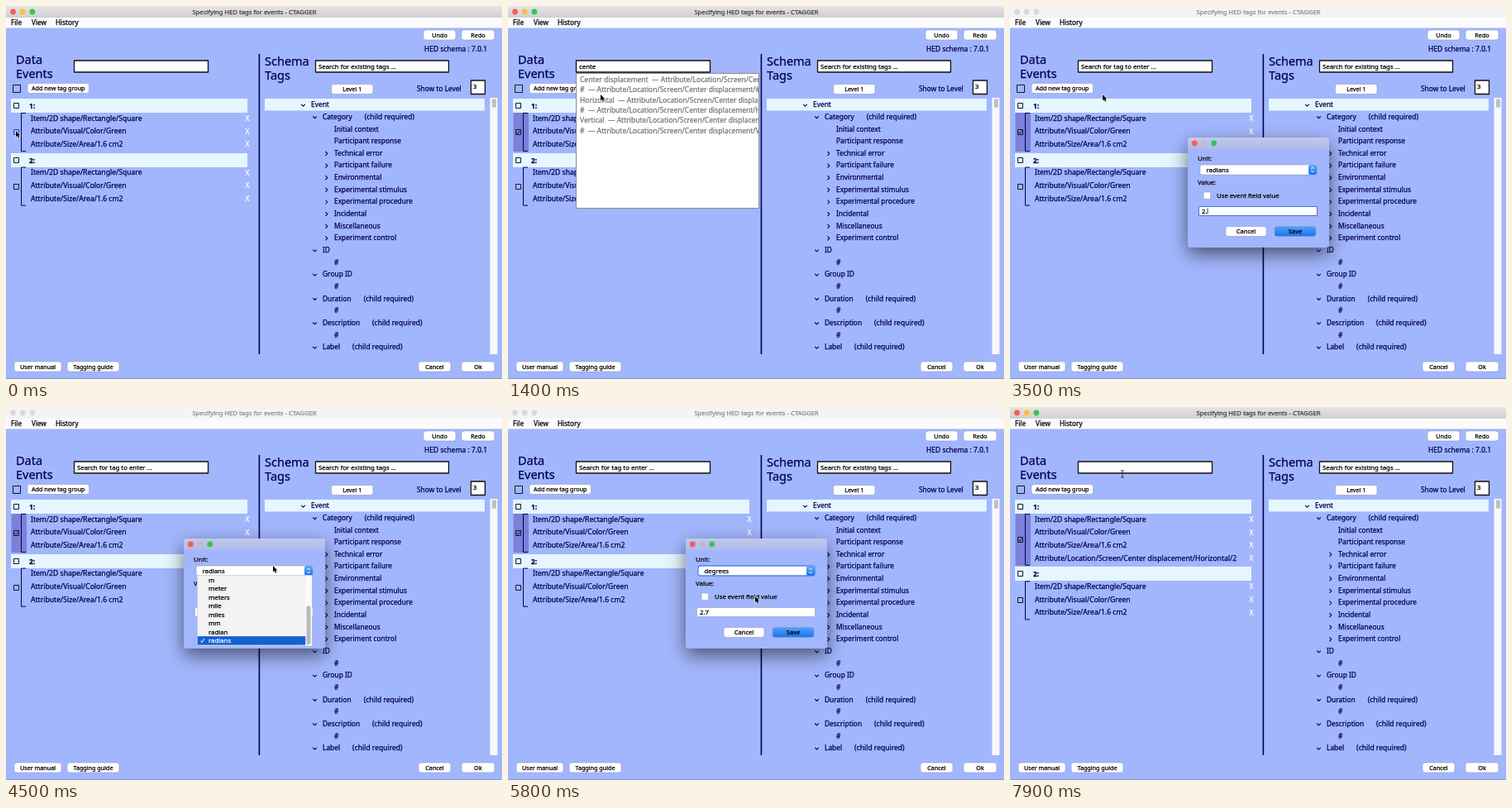
An HTML page with a canvas that plays this animation: 600 by 451 pixels, repeating every 8 s.

```html
<!DOCTYPE html>
<html>
<head>
<meta charset="utf-8">
<title>Tag editor</title>
<style>
html, body { margin: 0; width: 100%; height: 100%; overflow: hidden; background: #a2b6fd; }
canvas { display: block; width: 600px; height: 451px; }
</style>
</head>
<body>
<canvas id="stage"></canvas>
<script>
const LOOP = 8000, STEP = 100;
const NAVY = '#00004f', BLUE = '#a2b6fd', PALE = '#e5f6ff';
const canvas = document.getElementById('stage');
const ratio = window.devicePixelRatio || 1;
canvas.width = 600 * ratio;
canvas.height = 451 * ratio;
const c = canvas.getContext('2d');
c.scale(ratio, ratio);

// ---- timeline ----
const typed = [[0, ''], [600, 'c'], [700, 'ce'], [1000, 'cen'], [1200, 'cent'], [1400, 'cente'],
  [1600, 'center'], [1800, 'center '], [2000, 'center d'], [2600, null], [7800, '']];
const picked = [[0, -1], [2200, 0], [2300, 1], [2400, 2], [2500, 3]];
const amount = [[0, ''], [3300, '2'], [3500, '2.'], [3700, '2.7']];
const pointer = [[0, 12, 151], [200, 12, 151], [500, 112, 107], [3800, 112, 107], [4300, 323, 192],
  [4600, 323, 192], [4900, 299, 229], [5900, 299, 229], [6300, 345, 269], [7200, 345, 269], [7700, 136, 81]];
const scroll = [[0, 6], [4800, 6], [5200, 0]];

const shapeTags = ['Item/2D shape/Rectangle/Square', 'Attribute/Visual/Color/Green', 'Attribute/Size/Area/1.6 cm2'];
const newTag = 'Attribute/Location/Screen/Center displacement/Horizontal/2';
const units = 'cm degree degrees feet foot km m meter meters mile miles mm radian radians'.split(' ');

const control = 'Event/Category/Experiment control/Sequence';
const broadHits = [
  ['Experimental procedure', 'Event/Category/Experimental procedure'],
  ['#', 'Event/Category/Experimental procedure/#'],
  ['Miscellaneous', 'Event/Category/Miscellaneous'],
  ['#', 'Event/Category/Miscellaneous/#'],
  ['Sequence', control],
  ['Permutation ID', control + '/Permutation ID'],
  ['#', control + '/Permutation ID/#'],
  ['Experiment', control + '/Experiment'],
  ['Block', control + '/Block'],
  ['#', control + '/Block/#'],
  ['Trial', control + '/Block/Trial'],
  ['#', control + '/Block/Trial/#'],
  ['Pause', control + '/Pause']];
const center = 'Attribute/Location/Screen/Center displacement';
const centerHits = ['', '/#', '/Horizontal', '/Horizontal/#', '/Vertical', '/Vertical/#']
  .map(end => [end ? end.split('/').pop() : 'Center displacement', center + end]);

// depth, marker (v open, > closed), label, has required child
const tree = [[0, 'v', 'Event'], [1, 'v', 'Category', 1], [2, '', 'Initial context'], [2, '', 'Participant response'],
  ...['Technical error', 'Participant failure', 'Environmental', 'Experimental stimulus', 'Experimental procedure',
    'Incidental', 'Miscellaneous', 'Experiment control'].map(s => [2, '>', s]),
  [1, 'v', 'ID'], [2, '', '#'], [1, 'v', 'Group ID'], [2, '', '#'], [1, 'v', 'Duration', 1], [2, '', '#'],
  [1, 'v', 'Description', 1], [2, '', '#'], [1, 'v', 'Label', 1]];

const at = (keys, t) => keys.filter(k => k[0] <= t).pop()[1];

function glide(keys, t) {
  const i = keys.findIndex(k => k[0] > t);
  if (i < 0) return keys[keys.length - 1].slice(1);
  const a = keys[i - 1], b = keys[i];
  const p = (t - a[0]) / (b[0] - a[0]), e = p * p * (3 - 2 * p);
  return a.slice(1).map((v, j) => v + (b[j + 1] - v) * e);
}

// ---- drawing helpers ----
function rect(x, y, w, h, fill, stroke, line = 1) {
  if (fill) { c.fillStyle = fill; c.fillRect(x, y, w, h); }
  if (stroke) { c.strokeStyle = stroke; c.lineWidth = line; c.strokeRect(x, y, w, h); }
}

function round(x, y, w, h, r, fill, stroke, line = 0.6) {
  c.beginPath();
  c.roundRect(x, y, w, h, r);
  c.fillStyle = fill;
  c.fill();
  if (stroke) { c.strokeStyle = stroke; c.lineWidth = line; c.stroke(); }
}

// y is the middle of the line of text; a hairline outline makes it a little heavier
function text(s, x, y, size = 8.4, color = NAVY, weight = 500, align = 'left') {
  c.font = `${weight} ${size}px "Noto Sans", "Open Sans", sans-serif`;
  c.textAlign = align;
  c.fillStyle = c.strokeStyle = color;
  c.lineWidth = 0.25;
  c.lineJoin = 'round';
  c.fillText(s, x, y + size * 0.35);
  c.strokeText(s, x, y + size * 0.35);
}

function path(points, color, width) {
  c.beginPath();
  points.forEach(([x, y]) => c.lineTo(x, y));
  c.strokeStyle = color;
  c.lineWidth = width;
  c.stroke();
}

function vertical(y0, y1, top, bottom) {
  const g = c.createLinearGradient(0, y0, 0, y1);
  g.addColorStop(0, top);
  g.addColorStop(1, bottom);
  return g;
}

function button(label, x, y, w, fill = '#fff', size = 7.2) {
  round(x, y, w, 12, 3, fill, '#8d9ac4');
  text(label, x + w / 2, y + 6, size, '#000', 500, 'center');
}

// a square with its edges on whole pixels
function box(x, y, size, color = '#15152c', fill) {
  const edge = v => Math.floor(v - size / 2) + 0.5;
  rect(edge(x), edge(y), size, size, fill, color);
}

function lights(x, y, colors, gap) {
  colors.forEach((color, i) => {
    c.beginPath();
    c.arc(x + gap * i, y, 3.4, 0, 7);
    c.fillStyle = color;
    c.fill();
  });
}

function field(x, y, w, h, s, caret, border = '#111', line = 1.3) {
  rect(x, y, w, h, '#fff', border, line);
  text(s, x + 3.5, y + h / 2, 7.8, '#000');
  if (caret) {
    const end = x + 4 + c.measureText(s).width;
    path([[end, y + 2], [end, y + h - 2]], '#000', 0.8);
  }
}

// ---- parts ----
function windowFrame(modal) {
  rect(0, 0, 600, 451, BLUE);
  rect(0, 0, 600, 14, modal ? '#f4f4f4' : vertical(0, 14, '#e6e4e6', '#d0ced0'));
  rect(0, 14, 600, 12.5, '#fbfbfb');
  lights(8.5, 7, modal ? Array(3).fill('#d9d9d9') : ['#fc5b57', '#fdbc40', '#34c84a'], 11.7);
  text('Specifying HED tags for events - CTAGGER', 300.5, 7.2, 7.7, modal ? '#8c8c8c' : '#404040', 500, 'center');
  [['File', 6], ['View', 31], ['History', 60]].forEach(([s, x]) => text(s, x, 20, 8.2, '#000'));
  rect(0, 450, 600, 1, '#8b98c8');

  button('Undo', 505, 29, 39);
  button('Redo', 551, 29, 40);
  text('HED schema : 7.0.1', 506, 52, 8.5);
  [['Data', 12, 65], ['Events', 12, 82], ['Schema', 313, 67], ['Tags', 313, 84]]
    .forEach(([s, x, y]) => text(s, x, y, 14.5, NAVY, 400));
  box(13, 100, 9);
  button('Add new tag group', 26, 93.5, 74.5);
  button('Level 1', 393.5, 94.5, 50.5);
  text('Show to Level', 497, 100, 8.4);
  field(374.5, 66, 161, 14, 'Search for existing tags ...');
  rect(562.5, 90, 17, 16.5, '#fff', '#111', 1.3);
  text('3', 565, 97.2, 7.8, '#000');
  path([[306.4, 58], [306.4, 421]], NAVY, 1.6);
  button('User manual', 10, 430, 57);
  button('Tagging guide', 74, 430, 63);
  button('Cancel', 499, 430, 39);
  button('Ok', 551, 430, 40);
}

function schemaTree() {
  rect(313, 112, 266, 14.5, PALE);
  rect(585.5, 111, 9, 310, '#f8f8fa');
  round(588, 112, 5, 11, 2.5, '#c0c0c4');
  tree.forEach(([depth, mark, label, required], i) => {
    const y = 119.3 + 14.65 * i, x = 369 + 14 * depth, m = x - 9.5;
    text(label, x, y);
    if (required) text('(child required)', x + c.measureText(label).width + 15, y, 8.5);
    if (mark === 'v') path([[m - 2.3, y - 0.5], [m, y + 1.8], [m + 2.3, y - 0.5]], NAVY, 1.1);
    if (mark === '>') path([[m - 1, y - 2], [m + 1.3, y + 0.5], [m - 1, y + 3]], NAVY, 1.1);
  });
}

function eventGroups(t) {
  const checked = t >= 200, first = t >= 6700 ? [...shapeTags, newTag] : shapeTags;
  let y = 120.5;
  [first, shapeTags].forEach((tags, k) => {
    const top = y + 8.5, h = 15.7 * tags.length, mid = top + h / 2, on = checked && !k;
    rect(6, Math.round(y - 8.5), 286, 17, PALE);
    box(12.5, y, 6);
    text(k + 1 + ':', 28, y + 0.5, 8.4, NAVY, 700);
    if (on) rect(6.5, top, 18.5, h, '#7b80d8');
    path([[24, top + 0.5], [18.5, top + 0.5], [18.5, top + h - 0.5], [24, top + h - 0.5]], NAVY, 1);
    if (k || checked) box(12.5, mid, 6);
    else box(12.5, mid, 6, '#1747c8', '#86aaff');
    if (on) path([[10.5, mid], [12, mid + 1.8], [14.8, mid - 2]], '#15152c', 1);
    tags.forEach((tag, i) => {
      const row = y + 15.2 + 15.7 * i;
      text(tag, 30, row, 8.6);
      text('X', 292, row + 0.4, 8.4, '#fff', 500, 'center');
    });
    y = top + h + 10;
  });
}

function suggestions(query, chosen) {
  const broad = query.length < 3, hits = broad ? broadHits : centerHits;
  rect(82.5, 81.5, 221, 163, '#fff', '#8a8a8a');
  c.save();
  c.beginPath();
  c.rect(83, 82, broad ? 211 : 220, 162);
  c.clip();
  hits.forEach(([name, full], i) => {
    const on = i === chosen;
    text(`${name}  — ${full}`, 87, 89.2 + 12.3 * i, 8.5, on ? '#000' : '#777', on ? 600 : 500);
  });
  c.restore();
  if (broad) {
    rect(294, 82, 9, 162, '#f6f6f6');
    round(295.5, 84, 5.5, 14, 2.7, '#c0c0c0');
  }
}

function dialog(t) {
  const changed = t >= 5500, typing = t < 4400;
  c.save();
  c.shadowColor = 'rgba(0,0,0,.55)';
  c.shadowBlur = 22 * ratio;
  c.shadowOffsetY = 8 * ratio;
  round(215, 159, 171, 133, 3, BLUE);
  c.restore();
  round(215, 159, 171, 14, [3, 3, 0, 0], vertical(159, 173, '#c2c8ea', '#b0baec'));
  lights(223.3, 166, ['#fc5b57', '#b9bccf', '#34c84a'], 11.7);
  text('Unit:', 227, 184, 7.8, '#000');
  round(230, 192, 141, 12, 2.5, '#fff', changed ? '#4f86f0' : '#8d9ac4', changed ? 1.3 : 0.6);
  round(361, 192, 10, 12, 2.5, vertical(192, 204, '#62aaf8', '#1a74f0'));
  path([[364.2, 197], [366, 195], [367.8, 197]], '#fff', 0.9);
  path([[364.2, 199], [366, 201], [367.8, 199]], '#fff', 0.9);
  text(changed ? 'degrees' : 'radians', 237.5, 198, 7.8, '#000');
  text('Value:', 227, 213, 7.8, '#000');
  round(234, 225, 8.5, 8.5, 1.5, '#fff', '#8d9ac4');
  text('Use event field value', 250, 229, 7.8, '#000');
  field(228.5, 242.5, 143, 11, at(amount, t), typing && t % 1000 >= 500, typing ? '#4a6fd0' : '#a9b4dc', 1);
  button('Cancel', 261, 266.5, 49, '#fff', 7.6);
  button('Save', 320, 266.5, 50, vertical(266, 278, '#55a4f9', '#1a74f0'), 7.6);
}

function unitList(t, cursorY) {
  const [offset] = glide(scroll, t), top = 203.7, h = 10.5;
  const active = t < 4800 ? 13 : Math.floor((cursorY - top) / h + offset);
  rect(231.5, top, 138.5, 85, '#f3f3f3', '#c4c4c4', 0.6);
  c.save();
  c.beginPath();
  c.rect(231.5, top, 138.5, 84.5);
  c.clip();
  units.forEach((unit, i) => {
    const y = top + h * (i - offset), on = i === active, ink = on ? '#fff' : '#000';
    if (on) rect(231.5, y, 131, h, '#1560d4');
    text(unit, 245, y + 5.3, 7.8, ink);
    if (i === 13) path([[235.5, y + 5.5], [237, y + 7.5], [239.8, y + 2.8]], ink, 1);
  });
  c.restore();
  rect(362.5, top, 7.5, 84.5, '#fafafa');
  round(363.5, 205 + offset / 14 * 82, 5, 47, 2.5, '#b9b9b9');
}

function cursor(x, y, beam) {
  if (beam) {
    path([[x - 2, y - 4.5], [x, y - 3.7], [x + 2, y - 4.5]], '#222', 0.8);
    path([[x, y - 4], [x, y + 4]], '#222', 0.9);
    path([[x - 2, y + 4.5], [x, y + 3.7], [x + 2, y + 4.5]], '#222', 0.8);
    return;
  }
  c.beginPath();
  [[0, 0], [0, 7.6], [1.8, 6], [3, 8.8], [4.3, 8.2], [3.1, 5.5], [5.4, 5.4]]
    .forEach(([dx, dy]) => c.lineTo(x + dx, y + dy));
  c.closePath();
  c.strokeStyle = '#fff';
  c.lineWidth = 1.2;
  c.stroke();
  c.fillStyle = '#000';
  c.fill();
}

function draw(t) {
  const modal = t >= 2700 && t < 6600;
  const query = at(typed, t), chosen = at(picked, t);
  const [x, y] = glide(pointer, t);
  windowFrame(modal);
  schemaTree();
  eventGroups(t);
  field(82.5, 66, 162, 14, query === null ? 'Search for tag to enter ...' : query,
    query && chosen < 0 && t % 1000 >= 500);
  if (query) suggestions(query, chosen);
  if (modal) dialog(t);
  if (t >= 4400 && t < 5500) unitList(t, y);
  cursor(x, y, t >= 7700);
}

function tick(now) {
  draw(Math.floor(now % LOOP / STEP) * STEP);
  requestAnimationFrame(tick);
}
requestAnimationFrame(tick);
</script>
</body>
</html>
```
